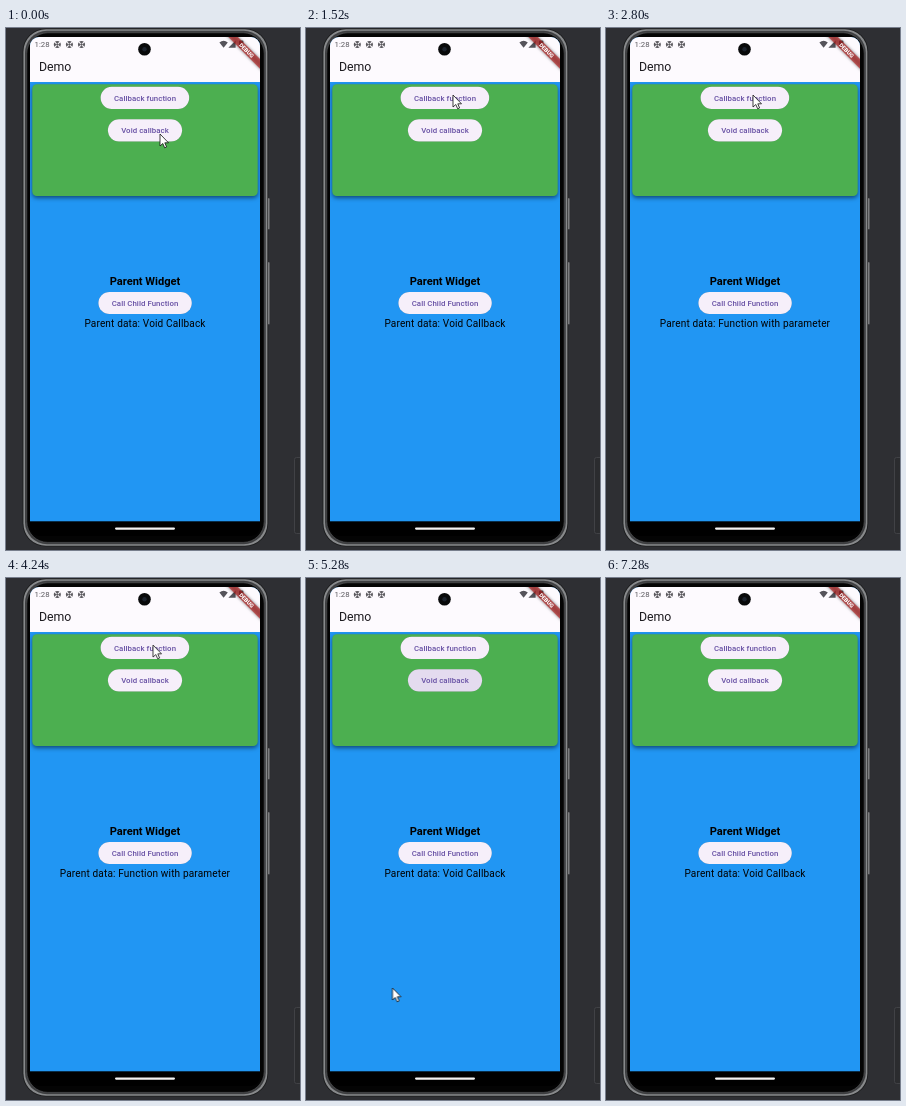
These frames come from a looping animation (294x522 px, 7520 ms). An HTML page:

```html
<!DOCTYPE html>
<html lang="en">
<head>
<meta charset="utf-8">
<title>Callback demo</title>
<style>
  html, body { margin: 0; width: 100%; height: 100%; overflow: hidden; background: #2e2f33; }
  svg { display: block; width: 294px; height: 522px; font-family: Roboto, sans-serif; }
  .body { font-size: 10.07px; letter-spacing: .14px; text-anchor: middle; }
  .heading { font-size: 11.1px; font-weight: 700; text-anchor: middle; }
  .label { font-size: 7.83px; font-weight: 500; letter-spacing: .056px; text-anchor: middle; fill: #6750a4; }
  .button { filter: drop-shadow(0 .7px .7px rgba(0, 0, 0, .35)); }
  .card { filter: drop-shadow(0 2px 2.2px rgba(0, 0, 0, .5)); }
  .press { fill: #6750a4; opacity: 0; }
  .banner-shadow { filter: blur(1.6px); }
</style>
</head>
<body>
<svg viewBox="0 0 294 522">
  <defs>
    <clipPath id="screen"><rect x="24" y="9" width="230" height="499" rx="9"/></clipPath>
    <g id="pinwheel">
      <circle r="3.5" fill="#5d5b60"/>
      <path d="M-3 -3L3 3M3 -3L-3 3" stroke="#fdfafe" stroke-width="1.1"/>
      <circle r="1.1" fill="#5d5b60"/>
    </g>
  </defs>
  <rect width="294" height="522" fill="#2e2f33"/>
  <rect x="288.5" y="429.5" width="16" height="76" rx="2" fill="#2b2c2f" stroke="#414246"/>

  <!-- device -->
  <g fill="#96989a" stroke="#303133" stroke-width=".5">
    <rect x="260.5" y="170" width="3.2" height="31.5" rx="1"/>
    <rect x="260.5" y="234" width="3.2" height="62.5" rx="1"/>
  </g>
  <rect x="16.6" y=".4" width="245.6" height="518.2" rx="23" fill="#1b1c1d"/>
  <rect x="17.4" y="1.2" width="244" height="516.6" rx="22.5" fill="#87898b"/>
  <rect x="19" y="2.8" width="240.8" height="513.4" rx="22" fill="#3d3e40"/>
  <rect x="20.8" y="4.8" width="237.4" height="509.6" rx="21" fill="#040404" stroke="#58595b" stroke-width=".6"/>

  <g clip-path="url(#screen)">
    <rect x="24" y="9" width="230" height="485" fill="#2196f3"/>
    <rect x="24" y="9" width="230" height="45" fill="#fdfafe"/>
    <rect x="24" y="493.3" width="230" height="15" fill="#000"/>
    <rect x="109" y="499.5" width="60" height="2.2" rx="1.1" fill="#f4f4f4"/>

    <text x="28.5" y="19.2" font-size="7.8" fill="#5d5b60">1:28</text>
    <use href="#pinwheel" x="51.3" y="16.6"/>
    <use href="#pinwheel" x="63.4" y="16.6"/>
    <use href="#pinwheel" x="75.5" y="16.6"/>
    <g fill="#55535a">
      <path d="M213.4 14.4Q217.6 11.2 221.8 14.4L217.6 19.8Z"/>
      <path d="M229.6 12.4V19.8H222.4Z"/>
      <rect x="233" y="12.4" width="4.4" height="7.4" rx=".7"/>
    </g>
    <text x="33" y="43.3" font-size="12.3" fill="#1d1b20">Demo</text>

    <rect class="card" x="26.3" y="56.3" width="225.4" height="111.7" rx="4.5" fill="#4caf50"/>
    <g id="buttons"></g>

    <text class="heading" x="139" y="257">Parent Widget</text>
    <text class="body" x="139" y="299.2" id="plain">Parent data: Void Callback</text>
    <text class="body" x="139" y="299.2" id="param" opacity="0">Parent data: Function with parameter</text>

    <g transform="translate(254 9) rotate(45)">
      <rect class="banner-shadow" x="-26" y="15.6" width="52" height="6.8" fill-opacity=".5"/>
      <rect x="-23" y="15.6" width="46" height="6.8" fill="#b71c1c" fill-opacity=".63"/>
      <text y="21" font-size="5.7" font-weight="900" fill="#fff" text-anchor="middle">DEBUG</text>
    </g>
  </g>
  <circle cx="138.5" cy="21.2" r="6.3" fill="#08090a"/>
  <circle cx="138.5" cy="21.2" r="2.2" fill="#1b222c"/>

  <path id="cursor" d="M0 0V12L2.8 9.5L4.7 13.8L6.6 13L4.8 8.8H8.5Z"
        fill="#fff" stroke="#111" stroke-width=".8" stroke-linejoin="round"/>
</svg>
<script>
  const DURATION = 7520;
  const byId = id => document.getElementById(id);

  function addButton(id, text, x, y, width) {
    const shape = `x="${x}" y="${y}" width="${width}" height="22.2" rx="11.1"`;
    byId('buttons').insertAdjacentHTML('beforeend', `
      <rect class="button" ${shape} fill="#f6effa"/>
      <rect class="press" id="${id}" ${shape}/>
      <text class="label" x="139" y="${y + 14}">${text}</text>`);
  }
  addButton('callback', 'Callback function', 94.6, 58.7, 88.6);
  addButton('void', 'Void callback', 101.9, 91.2, 74.2);
  addButton('child', 'Call Child Function', 92.4, 263.9, 93.4);

  // Each step is [time in ms, value].
  function loop(element, property, steps, easing = 'linear') {
    const frames = steps.map(([time, value]) => ({ offset: time / DURATION, [property]: value, easing }));
    frames.push({ offset: 1, [property]: steps.at(-1)[1] });
    element.animate(frames, { duration: DURATION, iterations: Infinity })
      .startTime = document.timeline.currentTime;
  }

  const at = (x, y) => `translate(${x}px, ${y}px)`;
  loop(byId('cursor'), 'transform', [
    [0, at(154, 106)], [160, at(154, 106)], [800, at(145, 72)], [960, at(144.5, 70)],
    [1520, at(147, 67)], [4240, at(147, 67)], [4800, at(150, 102)],
    [5040, at(150, 103)], [5280, at(86.5, 410)]
  ]);
  loop(byId('cursor'), 'opacity', [[0, 1], [5360, 0]], 'step-end');

  loop(byId('callback'), 'opacity', [[0, 0], [1680, 0], [1920, .15], [2080, .15], [2560, 0]]);
  loop(byId('void'), 'opacity', [[0, 0], [4880, 0], [5120, .14], [5280, .12], [5680, 0]]);

  loop(byId('plain'), 'opacity', [[0, 1], [1840, 0], [5040, 1]], 'step-end');
  loop(byId('param'), 'opacity', [[0, 0], [1840, 1], [5040, 0]], 'step-end');
</script>
</body>
</html>
```
